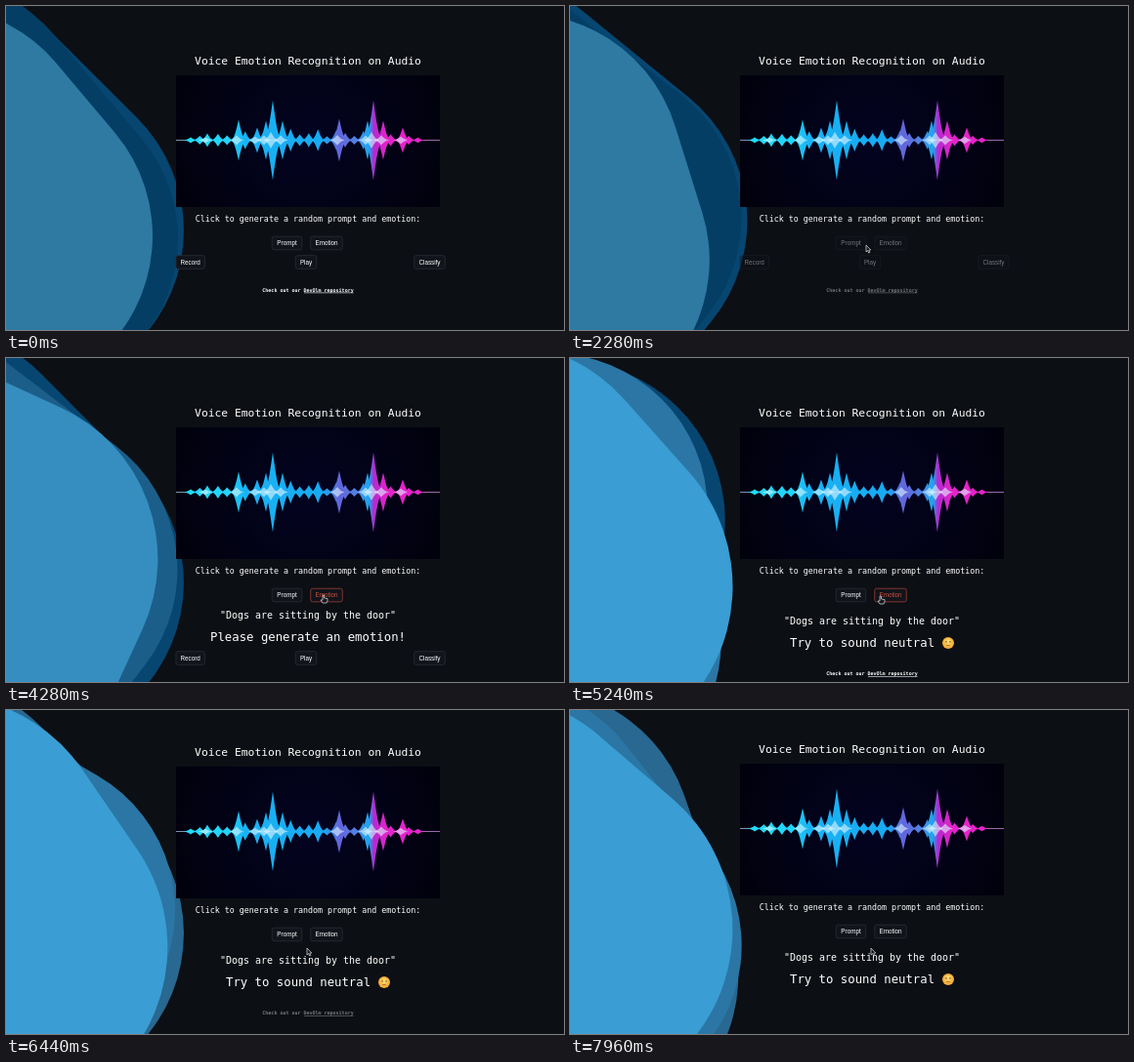
Animation of 571x332 px, one loop 8000 ms. Source, as an HTML page with a canvas:

```html
<!DOCTYPE html>
<html lang="en">
<head>
<meta charset="utf-8">
<title>Voice Emotion Recognition on Audio</title>
<style>
html, body { margin: 0; width: 100%; height: 100%; overflow: hidden; background: #0c0f14; }
canvas { display: block; width: 571px; height: 332px; }
</style>
</head>
<body>
<canvas id="stage"></canvas>
<script>
const W = 571, H = 332, LOOP = 8000;
const canvas = document.getElementById('stage');
const ctx = canvas.getContext('2d');
const dpr = window.devicePixelRatio || 1;
canvas.width = W * dpr;
canvas.height = H * dpr;

const MONO = '"DejaVu Sans Mono", monospace';
const SANS = '"Liberation Sans", Arial, sans-serif';

const clamp = v => Math.min(1, Math.max(0, v));
const ease = (t, from, to) => {
  const p = clamp((t - from) / (to - from));
  return p * p * (3 - 2 * p);
};
const mix = (a, b, p) => a + (b - a) * p;
const blend = (a, b, p) => `rgb(${a.map((v, i) => Math.round(mix(v, b[i], p)))})`;

// A rounded square turning about a point left of the stage; `angle` aims a corner.
function blob(half, roundness, angle, color) {
  ctx.save();
  ctx.translate(-80, 230);
  ctx.rotate((angle - 45) * Math.PI / 180);
  ctx.beginPath();
  ctx.roundRect(-half, -half, 2 * half, 2 * half, half * roundness);
  ctx.fillStyle = color;
  ctx.fill();
  ctx.restore();
}

function blobs(t) {
  const s = t / 1000;
  const brighten = ease(t, 3400, 5000), veil = ease(t, 5240, 6440);
  blob(233, 0.7, -42 * s, blend([7, 70, 113], [40, 104, 145], veil));
  blob(228, 0.7, 5 - 45 * s, blend([5, 62, 100], [43, 118, 164], brighten));
  blob(mix(211, 226, brighten), 0.78, 5 - 69 * s, blend([46, 122, 163], [58, 157, 211], brighten));
}

function text(str, y, size, options = {}) {
  const { x = 309, font = MONO, weight = '', color = '#fff', align = 'center' } = options;
  ctx.font = `${weight} ${size}px ${font}`;
  ctx.textAlign = align;
  ctx.textBaseline = 'middle';
  ctx.fillStyle = color;
  ctx.fillText(str, x, y);
}

function button(label, x, y, w, hover) {
  ctx.beginPath();
  ctx.roundRect(x - w / 2, y - 6.8, w, 13.6, 2);
  ctx.fillStyle = '#11141b';
  ctx.fill();
  ctx.strokeStyle = hover ? '#a03d35' : '#2b2e35';
  ctx.lineWidth = 0.8;
  ctx.stroke();
  text(label, y + 0.4, 6.3, { x, font: SANS, color: hover ? '#c94f3a' : '#fff' });
}

// Tall peaks [x, height]; small ripples fill the space between.
const PEAKS = [[206, 7], [238, 21], [257, 13], [266, 20], [273, 41], [283, 20], [341, 22],
  [370, 20], [376, 41], [386, 20], [406, 13]];
const COLORS = [[0, '#20dcfa'], [0.2, '#20d4fa'], [0.26, '#18b4f5'], [0.56, '#18a9f2'],
  [0.62, '#6663dc'], [0.69, '#4d86e4'], [0.73, '#18a9f2'], [0.75, '#b32bd0'], [0.8, '#e522ca']];

function horizontal(stops) {
  const gradient = ctx.createLinearGradient(174, 0, 444, 0);
  stops.forEach(([at, color]) => gradient.addColorStop(at, color));
  return gradient;
}

function spike(x, h, w) {
  ctx.beginPath();
  for (const side of [-h, h]) {
    ctx.moveTo(x - w, 0);
    ctx.bezierCurveTo(x - w * 0.5, 0, x - w * 0.3, side * 0.45, x, side);
    ctx.bezierCurveTo(x + w * 0.3, side * 0.45, x + w * 0.5, 0, x + w, 0);
  }
  ctx.fill();
}

function picture() {
  const glow = ctx.createRadialGradient(309, 138, 10, 309, 138, 150);
  glow.addColorStop(0, '#030320');
  glow.addColorStop(1, '#01010c');
  ctx.fillStyle = glow;
  ctx.fillRect(174, 71, 270, 135);

  ctx.save();
  ctx.translate(0, 137.5);
  ctx.fillStyle = horizontal([[0, '#7d8fb0'], [0.5, '#9adcff'], [1, '#9a62aa']]);
  ctx.fillRect(174, -0.5, 270, 1);
  ctx.fillStyle = horizontal(COLORS);
  for (let i = 0; i < 26; i++) {
    const x = 189 + i * 9.3;
    const swell = Math.sin(Math.PI * (i + 1.5) / 28);
    spike(x, 2 + swell * (6 + 4 * Math.sin(i * 2.4)), 8);
  }
  for (const [x, h] of PEAKS) spike(x, h, 7 + h * 0.09);
  ctx.fillStyle = 'rgba(225,247,255,.6)';
  for (const [x, h] of PEAKS) spike(x - 2, 1.5 + h * 0.17, 9);
  ctx.restore();
}

function emoji(x, y) {
  const skin = ctx.createRadialGradient(x, y - 2, 1, x, y, 6);
  skin.addColorStop(0, '#ffdc70');
  skin.addColorStop(1, '#f2a32f');
  ctx.fillStyle = skin;
  ctx.beginPath();
  ctx.arc(x, y, 6, 0, 7);
  ctx.fill();
  ctx.fillStyle = '#8a5a22';
  ctx.fillRect(x - 2.6, y - 2, 1.2, 1.6);
  ctx.fillRect(x + 1.4, y - 2, 1.2, 1.6);
  ctx.fillRect(x - 1.8, y + 2.3, 3.6, 0.7);
}

function link(y) {
  text('Check out our DevOlm repository', y, 5, { weight: 'bold' });
  ctx.fillRect(305, y + 2.3, 50.5, 0.6);
}

// Pointer stops: [leave, arrive, x, y].
const STOPS = [[0, 0, 378, 340], [400, 900, 270, 223], [1100, 1600, 290, 243],
  [1900, 2280, 303, 245], [2750, 3250, 325, 243], [4700, 5240, 318, 244], [5700, 6200, 308, 244]];

function pointer(t) {
  let [, , x, y] = STOPS[0];
  for (const [leave, arrive, nextX, nextY] of STOPS) {
    const p = ease(t, leave, arrive || 1);
    x = mix(x, nextX, p);
    y = mix(y, nextY, p);
  }
  const hand = (t > 1500 && t < 2000) || (t > 3100 && t < 5760);
  const shape = hand
    ? [[-1, 0], [0.5, 0], [0.5, 3], [4, 3.5], [4, 6], [3, 8], [-1, 8], [-3, 5], [-1, 5]]
    : [[0, 0], [0, 7], [1.6, 5.6], [2.7, 8], [3.8, 7.5], [2.8, 5.1], [4.8, 5]];
  ctx.fillStyle = '#16181c';
  ctx.strokeStyle = '#dfe1e5';
  ctx.lineWidth = 0.7;
  ctx.beginPath();
  shape.forEach(([dx, dy]) => ctx.lineTo(x + dx, y + dy));
  ctx.closePath();
  ctx.fill();
  ctx.stroke();
}

function page(t) {
  const prompted = t >= 2560, emotional = t >= 4640;
  const scroll = 13 * ease(t, 5960, 6320) + 3 * ease(t, 6900, 7300);
  ctx.save();
  ctx.translate(0, -scroll);
  text('Voice Emotion Recognition on Audio', 57.5, 11.33);
  picture();
  text('Click to generate a random prompt and emotion:', 219, 8.33);

  ctx.globalAlpha = prompted ? 1 : mix(1, 0.42, ease(t, 1960, 2200));
  button('Prompt', 287.5, 243, 30.5, t > 1500 && t < 2000);
  button('Emotion', 328, 243, 32.5, t > 3100 && t < 5760);
  if (!emotional) {
    const row = prompted ? 307.5 : 262.5;
    button('Record', 188.7, row, 29.5);
    button('Play', 307, row, 21.5);
    button('Classify', 433.5, row, 31.5);
  }
  if (!prompted) link(291.3);
  if (emotional && t < 6900) {
    ctx.globalAlpha = mix(1, 0.45, ease(t, 5800, 6200));
    link(324);
  }
  ctx.globalAlpha = 1;
  if (prompted) text('"Dogs are sitting by the door"', emotional ? 270 : 264.3, 9.97);
  if (emotional) {
    text('Try to sound neutral', 293, 12.3, { x: 225, align: 'left' });
    emoji(387, 292);
  } else if (prompted) {
    text('Please generate an emotion!', 287, 12.3);
  }
  ctx.restore();
}

function draw(now) {
  const t = now % LOOP;
  ctx.setTransform(dpr, 0, 0, dpr, 0, 0);
  ctx.fillStyle = '#0c0f14';
  ctx.fillRect(0, 0, W, H);
  blobs(t);
  page(t);
  pointer(t);
}

const start = performance.now();
function tick() {
  draw(performance.now() - start);
  requestAnimationFrame(tick);
}
tick();
</script>
</body>
</html>
```
